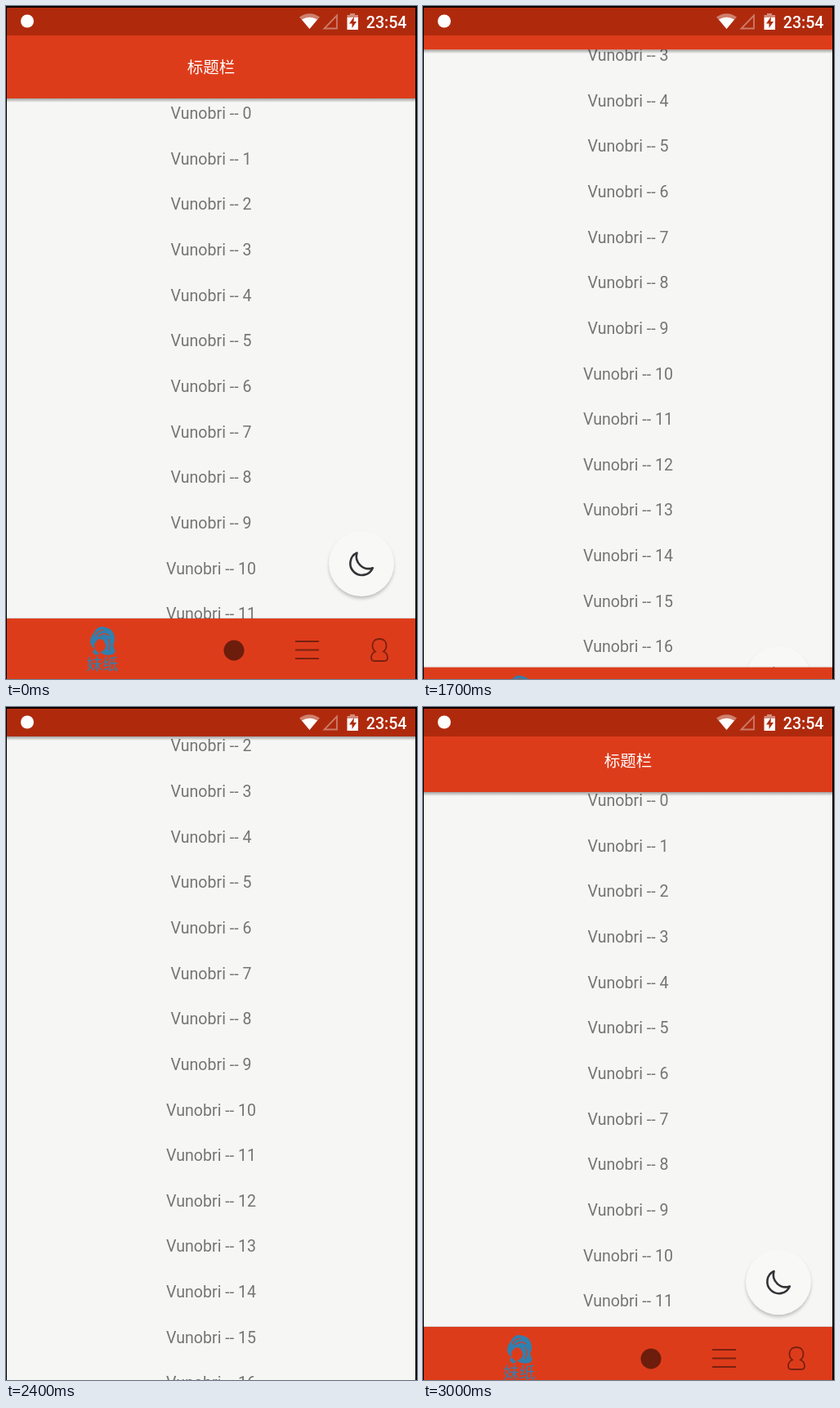
Write an HTML page that moves like this. It is 503 by 823 pixels and loops after 3100 ms.

```html
<!DOCTYPE html>
<html lang="zh-CN">
<head>
<meta charset="utf-8">
<style>
  html, body { margin: 0; width: 100%; height: 100%; overflow: hidden; background: #000; }
  svg { display: block; width: 503px; height: 823px; }
  text { font-family: Roboto, "Noto Sans CJK SC", "Noto Sans CJK", sans-serif; font-size: 19.6px; }
  #list text { fill: #757575; text-anchor: middle; }
  .cjk { font-family: "Noto Sans CJK SC", "Noto Sans CJK", sans-serif; font-size: 19.5px; text-anchor: middle; }
  .line { fill: none; stroke: #7a2010; stroke-width: 1.8; }
</style>
</head>
<body>
<svg viewBox="0 0 503 823">
  <defs>
    <clipPath id="screen"><path d="M1 2H501V823H1Z"/></clipPath>
    <linearGradient id="fade" x2="0" y2="1">
      <stop stop-color="#000" stop-opacity=".34"/>
      <stop offset="1" stop-color="#000" stop-opacity="0"/>
    </linearGradient>
    <filter id="soft" x="-30%" y="-30%" width="160%" height="160%"><feGaussianBlur stdDeviation="2.2"/></filter>
  </defs>
  <rect width="503" height="823"/>
  <g clip-path="url(#screen)">
    <rect width="503" height="823" fill="#f6f6f5"/>
    <g id="list"></g>

    <g id="fab">
      <circle cx="435" cy="685" r="39.5" opacity=".24" filter="url(#soft)"/>
      <circle cx="435" cy="682" r="40" fill="#f8f8f7"/>
      <path d="M429.5 668.7A14.3 14.3 0 1 0 448.8 687.2A15 15 0 0 1 429.5 668.7Z" fill="none" stroke="#353337" stroke-width="2.6" stroke-linejoin="round"/>
    </g>

    <g id="topBar">
      <rect y="113" width="503" height="5" fill="url(#fade)"/>
      <rect y="34" width="503" height="79" fill="#dd3c1b"/>
      <text class="cjk" x="251" y="82" fill="#fff">标题栏</text>
    </g>

    <g id="bottomBar">
      <rect y="748" width="503" height="1" opacity=".12"/>
      <rect y="749" width="503" height="80" fill="#dd3c1b"/>
      <g fill="#327fae">
        <path d="M103 778C103 771 107 768 109 764C112 759 118 758 122 760C129 761 133 767 133 774C133 779 130 781 132 785C134 788 134 792 130 793C124 795 118 793 115 790C120 789 122 786 122 781L119 775L113 774L108 780L109 786L105 783Z"/>
        <path d="M108 786L114 792L110 794L106 790Z"/>
        <path d="M109 770Q113 763 120 763M113 771Q120 765 126 770M125 774Q129 780 125 788" fill="none" stroke="#dd3c1b" stroke-width="1.2"/>
        <text class="cjk" x="118" y="812">妹纸</text>
      </g>
      <circle cx="279" cy="788" r="12.5" fill="#6c1d0c"/>
      <path class="line" d="M354 777H383M354 787.5H383M354 798H383"/>
      <path class="line" d="M457 774C451 774 448.500 778 448.500 782C448.500 785 450 788 452 789.500C448 791 447 794 447 797Q447 801 451 801H463Q467 801 467 797C467 794 466 791 462 789.500C464 788 465.500 785 465.500 782C465.500 778 463 774 457 774Z"/>
    </g>

    <g fill="#fff">
      <rect width="503" height="36" fill="#af2a0d"/>
      <circle cx="26" cy="18.500" r="8"/>
      <path d="M371.500 28L359 13.500Q371.500 5 384 13.500Z" opacity=".4"/>
      <path d="M371.500 28L362 16.500Q371.500 11 381 16.500Z"/>
      <path d="M389.500 27.500H405V11.500Z" fill="none" stroke="#fff" stroke-width="1.8" opacity=".38"/>
      <path d="M417.500 14V11H421V9H427V11H431V14Z" opacity=".45"/>
      <path d="M417.500 14H431V29H417.500Z"/>
      <path d="M426 13L420 21.500H423.500V27L429 19H425.500Z" fill="#af2a0d"/>
      <text x="490.500" y="26.500" text-anchor="end" font-weight="500">23:54</text>
    </g>
  </g>
</svg>
<script>
  const LOOP = 3100, REST = 1200, STEP = 100;
  // [time in ms, distance in px]
  const scrollKeys = [[1200, 21], [1500, 180], [1700, 238], [1900, 257], [2400, 195], [2700, 84.5], [3000, 17]];
  const hideKeys = [[1200, 0], [1500, 37], [1900, 75], [2000, 77], [2400, 77], [2700, 14], [3000, 9]];
  const byId = id => document.getElementById(id);
  const list = byId('list');

  for (let i = 0; i < 20; i++) {
    const row = document.createElementNS('http://www.w3.org/2000/svg', 'text');
    row.setAttribute('x', 251);
    row.setAttribute('y', 138 + i * 55.65);
    row.textContent = 'Vunobri -- ' + i;
    list.append(row);
  }

  const slope = (a, b) => (b[1] - a[1]) / (b[0] - a[0]);

  // Tangent that never overshoots: harmonic mean of the neighbouring slopes.
  function tangent(keys, i) {
    if (i === 0) return slope(keys[0], keys[1]);
    if (i === keys.length - 1) return slope(keys[i - 1], keys[i]);
    const before = slope(keys[i - 1], keys[i]), after = slope(keys[i], keys[i + 1]);
    return before * after > 0 ? 2 * before * after / (before + after) : 0;
  }

  function curve(keys, time) {
    let i = 0;
    while (i < keys.length - 2 && time > keys[i + 1][0]) i++;
    const [t0, v0] = keys[i], [t1, v1] = keys[i + 1];
    const span = t1 - t0, u = (time - t0) / span, w = 1 - u;
    return v0 * (1 + 2 * u) * w * w + v1 * u * u * (3 - 2 * u)
      + span * u * w * (tangent(keys, i) * w - tangent(keys, i + 1) * u);
  }

  const shift = (id, y) => byId(id).setAttribute('transform', `translate(0 ${y})`);

  function draw() {
    const time = Math.floor(performance.now() % LOOP / STEP) * STEP;
    const resting = time < REST;
    const scroll = resting ? 0 : curve(scrollKeys, time);
    const hidden = resting ? 0 : curve(hideKeys, time);
    shift('list', -scroll);
    shift('topBar', -hidden);
    shift('bottomBar', hidden);
    shift('fab', hidden * 2.36);
    requestAnimationFrame(draw);
  }
  draw();
</script>
</body>
</html>
```
